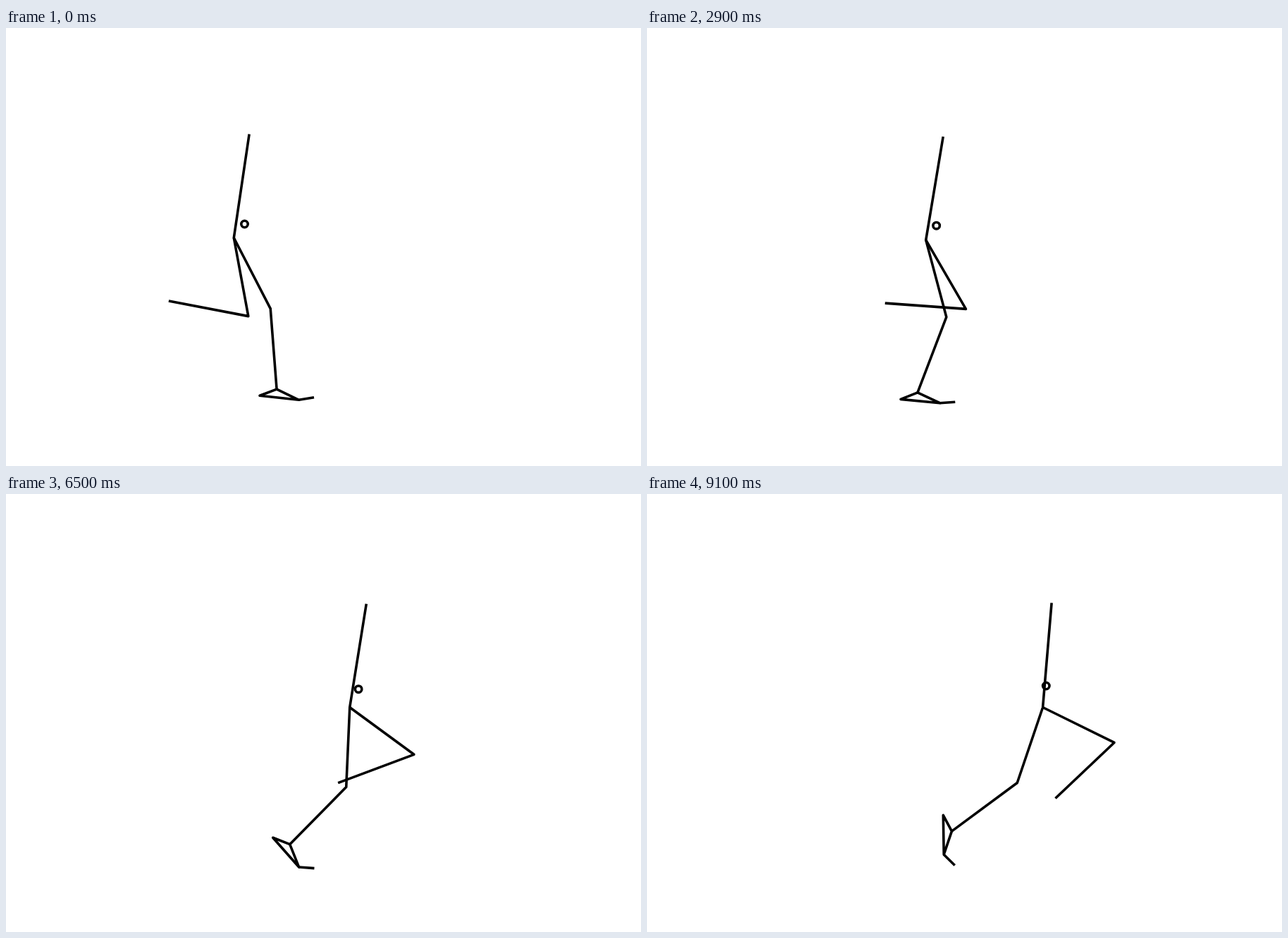
Write an HTML page with a canvas that moves like this. It is 901x621 px and loops after 9200 ms.

```html
<!DOCTYPE html>
<html lang="en">
<head>
<meta charset="utf-8">
<title>Running leg model</title>
<style>
html, body { margin: 0; width: 100%; height: 100%; overflow: hidden; background: #fff; }
canvas { display: block; }
</style>
</head>
<body>
<canvas id="stage" width="901" height="621"></canvas>
<script>
const ctx = document.getElementById('stage').getContext('2d');
const LOOP = 9200, STEP = 100;
const TRUNK = 148.7, THIGH = 113, SHIN = 115, FOOT = 55.8, ANKLE = 34.9, TOE = 21.8;
const ANKLE_ANGLE = 19.7;

// Polynomial with coefficients in rising order.
const poly = (s, ...c) => c.reduceRight((sum, k) => sum * s + k, 0);

// Angle 0 points right; positive turns clockwise.
function reach([x, y], length, degrees) {
  const a = degrees * Math.PI / 180;
  return [x + length * Math.cos(a), y + length * Math.sin(a)];
}

function line(points, closed) {
  ctx.beginPath();
  for (const p of points) ctx.lineTo(...p);
  if (closed) ctx.closePath();
  ctx.stroke();
}

// s runs from 0 to 1 over one stride.
function draw(s) {
  const landing = Math.exp(-s / 0.07);
  const pushOff = s ** 6;

  const hip = [poly(s, 323.3, 231.9, -24.3, 30.7), poly(s, 297.5, 12, -7)];
  const mass = [poly(s, 338.5, 228.2, -8.4, 8), poly(s, 278, 16.7, -34.4, 11.7)];
  const ball = [415.5 + 5.7 * s ** 10, 531.8 - 4.5 * landing - 20.6 * pushOff];

  const lean = poly(s, 8.44, 1.69, 9.6, -14.9);
  const stanceThigh = poly(s, 27.36, -39.5, 5, -11.6);
  const swingThigh = poly(s, 10.46, 55, 31.7, -33.4);
  const swingShin = poly(s, -100.84, -4.2, 89.3, -30.8);
  const foot = poly(s, 6.17, -25, -15.5, 345.4, -222);
  const toeBend = 6 * s - 6 - 3.4 * landing + 44.6 * pushOff;

  const head = reach(hip, TRUNK, lean - 90);
  const stanceKnee = reach(hip, THIGH, 90 - stanceThigh);
  const swingKnee = reach(hip, THIGH, 90 - swingThigh);
  const swingAnkle = reach(swingKnee, SHIN, 90 - swingShin);
  const heel = reach(ball, FOOT, 180 + foot);
  const ankle = reach(ball, ANKLE, 180 + foot + ANKLE_ANGLE);
  const toe = reach(ball, TOE, toeBend);

  ctx.fillStyle = '#fff';
  ctx.fillRect(0, 0, 901, 621);
  ctx.strokeStyle = '#000';
  ctx.lineWidth = 3.6;
  ctx.lineJoin = 'round';
  line([head, hip, stanceKnee, ankle]);
  line([hip, swingKnee, swingAnkle]);
  line([ankle, heel, ball], true);
  line([ball, toe]);
  ctx.beginPath();
  ctx.arc(...mass, 4.7, 0, 2 * Math.PI);
  ctx.stroke();
}

const start = performance.now();
function tick() {
  const ms = (performance.now() - start) % LOOP;
  draw(Math.floor(ms / STEP) * STEP / (LOOP - STEP));
  requestAnimationFrame(tick);
}
tick();
</script>
</body>
</html>
```
